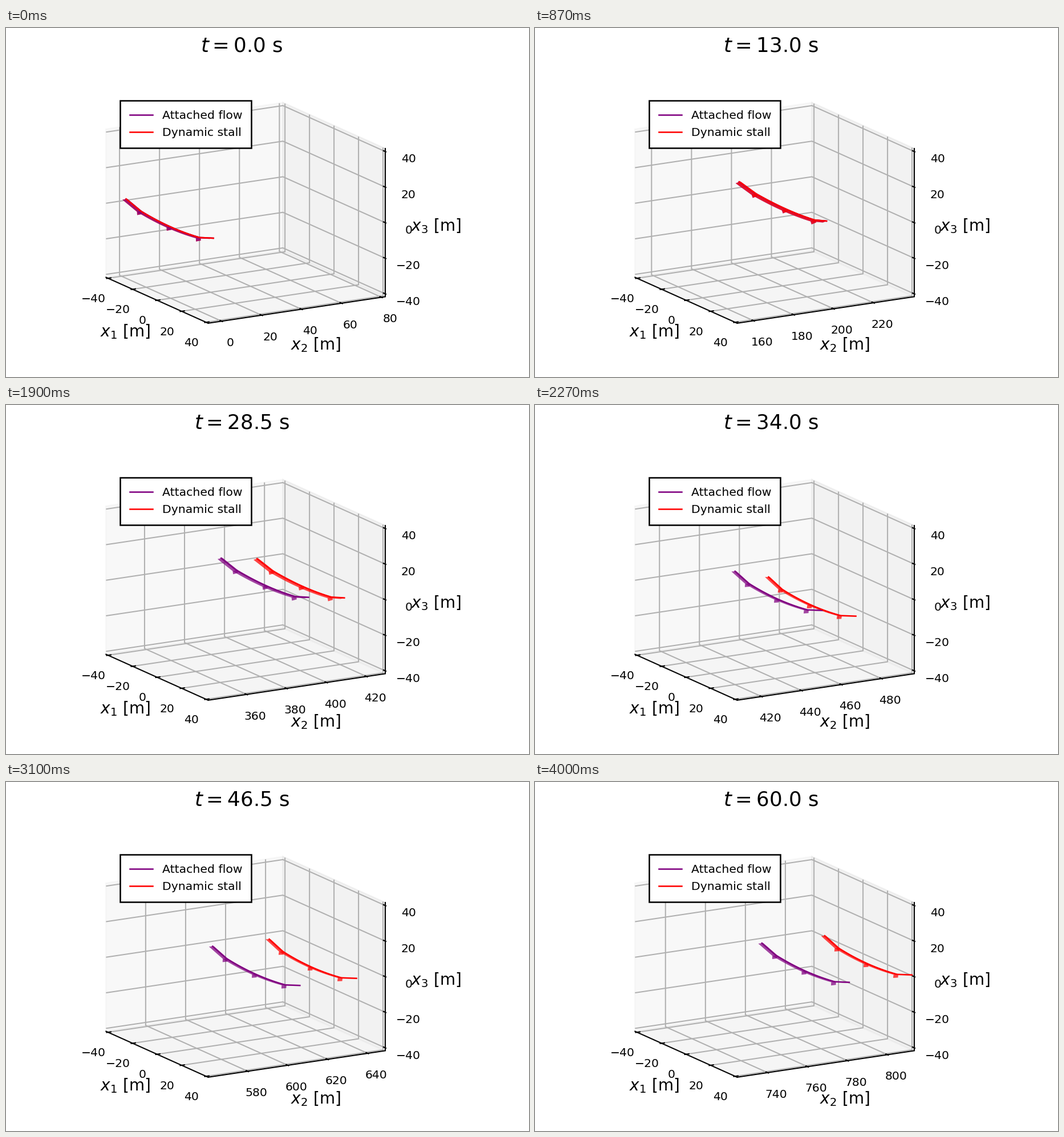
A matplotlib script that plays this animation: 917x611 px, repeating every 4.03 s.

```python
import numpy as np
import matplotlib.pyplot as plt
from matplotlib.animation import FuncAnimation
from matplotlib.collections import LineCollection, PolyCollection
from matplotlib.patches import Polygon, Rectangle

W, H, DPI = 917, 611, 128
LOOP_MS, FRAMES, DT = 4030, 121, 0.5
PX = 72 / DPI             # points per pixel
UNIT = 2.547              # pixels per nominal point
TICK, GUIDE, TITLE = (n * UNIT * PX for n in (8, 11, 14))
THIN, LINE = 0.8 * UNIT * PX, UNIT * PX

SPEED = 12.192            # camera speed along x2, m/s
LO, SPAN = -5, 85         # visible x2 range at t = 0
PAD = 1 / 48              # box margin on each side
STEP = 20

# Orthographic view: azimuth 30, elevation 15, box 4:4:3
SCALE = 358.2
SIN_E, COS_E = np.sin(np.radians(15)), np.cos(np.radians(15))
SIN_A, COS_A = np.sin(np.radians(30)), np.cos(np.radians(30))
FIT = 1 + 2 * PAD
KX, KY, KZ = SCALE / (80 * FIT), SCALE / (SPAN * FIT), 0.75 * SCALE / (80 * FIT)

XM = 40 * FIT
Y0, Y1 = LO - SPAN * PAD, LO + SPAN * (1 + PAD)
ZM = 40 * FIT


def proj(x, y, z):
    """Pixel position of a point; y is measured from the moving camera."""
    v = y - (LO + SPAN / 2)
    px = 420 + SIN_A * KX * x + COS_A * KY * v
    py = 323.75 + SIN_E * (COS_A * KX * x - SIN_A * KY * v) - COS_E * KZ * z
    return np.stack(np.broadcast_arrays(px, py), axis=-1)


def path(*points):
    return np.array([proj(*p) for p in points])


# ---- flight paths -------------------------------------------------------
PERIOD, BOTTOM = 14.0, 36.6
KNOTS = np.array([0, 13, 23, 34, 41, 52, 60.0])
FLIGHTS = {
    "purple": dict(
        lead=[-0.2, 42.9, 43.2, 39.2, 54.6, 51.1, 52.9],
        height=[-1.45, 1.28, -9.4, -5.5, -4.55, -7.8, -4.9],
        swing=[0, 12, 9, 7, 6.3, 5, 4.3]),
    "red": dict(
        lead=[-0.2, 43.0, 57.4, 55.7, 82.8, 88.8, 84.0],
        height=[-1.45, 1.28, -13.1, -11.5, -4.0, -12.9, -6.0],
        swing=[0, 12, 11, 10, 9.5, 8.5, 8]),
}


def hermite(t, ts, vs):
    slopes = np.gradient(vs, ts)
    slopes[0] = 0
    i = min(np.searchsorted(ts, t, side="right") - 1, len(ts) - 2)
    h = ts[i + 1] - ts[i]
    u = (t - ts[i]) / h
    return ((1 + 2 * u) * (1 - u) ** 2 * vs[i] + u * (1 - u) ** 2 * h * slopes[i]
            + u * u * (3 - 2 * u) * vs[i + 1] + u * u * (u - 1) * h * slopes[i + 1])


def pose(flight, t):
    """Lead over the camera, height and pitch: a slow drift plus a phugoid."""
    def swing(s):
        amp = np.interp(s, KNOTS, flight["swing"])
        phase = 2 * np.pi * (s - BOTTOM) / PERIOD
        return amp * np.sin(phase), -0.62 * amp * np.cos(phase)

    surge, heave = swing(t)
    surge_k, heave_k = swing(KNOTS)
    lead = surge + hermite(t, KNOTS, flight["lead"] - surge_k)
    height = heave + hermite(t, KNOTS, flight["height"] - heave_k)
    return lead, height, np.radians(3 + 1.2 * surge)


# ---- aircraft -----------------------------------------------------------
TIP, POD, POD_H = 35.6, 24.0, 1.83
NOSE, TAIL = 0.6, -1.83
SPAN_X = np.linspace(-TIP, TIP, 90)


def bend(x):
    a = np.abs(x)
    inner = 1.4 * (np.minimum(a, POD) / POD) ** 2
    return inner + 3.25 * np.maximum(a - POD, 0) / (TIP - POD)


def aircraft(flight, t):
    lead, height, pitch = pose(flight, t)
    s, c = np.sin(pitch), np.cos(pitch)

    def body(x, fwd, up):
        return proj(x, lead + fwd * c - up * s, height + fwd * s + up * c)

    up = bend(SPAN_X)
    spar = body(SPAN_X, 0, up)
    skin = np.vstack([body(SPAN_X, NOSE, up), body(SPAN_X, TAIL, up)[::-1]])
    pods = []
    for x in (-POD, 0, POD):
        u = bend(x)
        pods.append(np.array([body(x, NOSE, u), body(x, TAIL, u),
                              body(x, TAIL, u - POD_H), body(x, NOSE, u - POD_H)]))
    return spar, [skin] + pods


# ---- stage --------------------------------------------------------------
plt.rcParams["font.family"] = "DejaVu Sans"
fig = plt.figure(figsize=(W / DPI, H / DPI), dpi=DPI, facecolor="white")
ax = fig.add_axes([0, 0, 1, 1])
ax.set_xlim(0, W)
ax.set_ylim(H, 0)
ax.axis("off")


def text(x, y, s, size, ha="center", z=9):
    return ax.text(x, y, s, fontsize=size, ha=ha, va="baseline", color="black", zorder=z)


def lines(segments, color, z, cap="butt"):
    col = LineCollection(segments, colors=color, linewidths=THIN, zorder=z, capstyle=cap)
    ax.add_collection(col, autolim=False)
    return col


def pane(shade, *corners):
    ax.add_patch(Polygon(path(*corners), closed=True, facecolor=(shade,) * 3 + (0.5,),
                         edgecolor=(shade,) * 3 + (0.5,), linewidth=LINE, zorder=1))


pane(0.95, (-XM, Y0, -ZM), (-XM, Y1, -ZM), (-XM, Y1, ZM), (-XM, Y0, ZM))
pane(0.90, (-XM, Y1, -ZM), (XM, Y1, -ZM), (XM, Y1, ZM), (-XM, Y1, ZM))
pane(0.925, (-XM, Y0, -ZM), (XM, Y0, -ZM), (XM, Y1, -ZM), (-XM, Y1, -ZM))

OUT_X, IN_X = 80 / 120, 80 / 60
OUT_Y, IN_Y = SPAN / 120, SPAN / 60
GREY = "#b0b0b0"
grid, ticks = [], []
for v in range(-40, 41, STEP):
    label = str(v).replace("-", "\u2212")
    grid.append(path((v, Y0, -ZM), (v, Y1, -ZM), (v, Y1, ZM)))
    grid.append(path((-XM, Y0, v), (-XM, Y1, v), (XM, Y1, v)))
    ticks.append(path((v, Y0 - OUT_Y, -ZM), (v, Y0 + IN_Y, -ZM)))
    ticks.append(path((XM + OUT_X, Y1, v), (XM - IN_X, Y1, v)))
    x, y = proj(v, Y0, -ZM)
    text(x - 25.8, y + 41.6, label, TICK)
    x, y = proj(XM, Y1, v)
    text(x + 41, y + 19.3, label, TICK)
lines(grid, GREY, 2)
lines(ticks, "black", 4, "projecting")
lines([path((-XM, Y0, -ZM), (XM, Y0, -ZM)), path((XM, Y0, -ZM), (XM, Y1, -ZM)),
       path((XM, Y1, -ZM), (XM, Y1, ZM))], "black", 4, "projecting")

for x, y, n in ((209.5, 540, 1), (543.5, 563, 2), (754.5, 355, 3)):
    text(x, y, f"$x_{n}$ [m]", GUIDE)

moving_grid = lines([], GREY, 2)
moving_ticks = lines([], "black", 4, "projecting")
labels = [text(0, 0, "", TICK) for _ in range(5)]
title = text(413.3, 41, "", TITLE)

# legend
ax.add_patch(Rectangle((199.8, 127.2), 230.2, 82.8, facecolor="white",
                       edgecolor="black", linewidth=LINE, zorder=10))
for y, color, name in ((152.1, "purple", "Attached flow"), (182.2, "red", "Dynamic stall")):
    ax.plot([216.6, 257.4], [y, y], color=color, lw=LINE, zorder=11)
    text(273.7, y + 7.2, name, TICK, ha="left", z=11)

skins, spars = {}, {}
for k, color in enumerate(FLIGHTS):
    skins[color] = PolyCollection([], facecolors=color, edgecolors="none",
                                  alpha=0.72, zorder=5 + 0.2 * k)
    ax.add_collection(skins[color], autolim=False)
    spars[color], = ax.plot([], [], color=color, lw=LINE, zorder=6 + 0.2 * k)


def draw(i):
    t = i * DT
    shift = SPEED * t
    title.set_text(f"$t = {t:.1f}$ s")

    first = int(np.ceil((LO + shift) / STEP)) * STEP
    values = np.arange(first, LO + SPAN + shift + 1e-6, STEP)
    moving_grid.set_segments([path((XM, v, -ZM), (-XM, v, -ZM), (-XM, v, ZM))
                              for v in values - shift])
    moving_ticks.set_segments([path((XM + OUT_X, v, -ZM), (XM - IN_X, v, -ZM))
                               for v in values - shift])
    for k, label in enumerate(labels):
        label.set_visible(k < len(values))
        if k < len(values):
            x, y = proj(XM, values[k] - shift, -ZM)
            label.set_position((x + 14.8, y + 43.9))
            label.set_text(f"{values[k]:.0f}")

    for color, flight in FLIGHTS.items():
        spar, skin = aircraft(flight, t)
        skins[color].set_verts(skin)
        spars[color].set_data(spar[:, 0], spar[:, 1])
    skins["purple"].set_zorder(5.4 if t < 2 else 5)
    return []


anim = FuncAnimation(fig, draw, frames=FRAMES, init_func=lambda: draw(0),
                     interval=LOOP_MS / FRAMES, repeat=True, repeat_delay=0,
                     blit=False, cache_frame_data=False)
plt.show()
```
